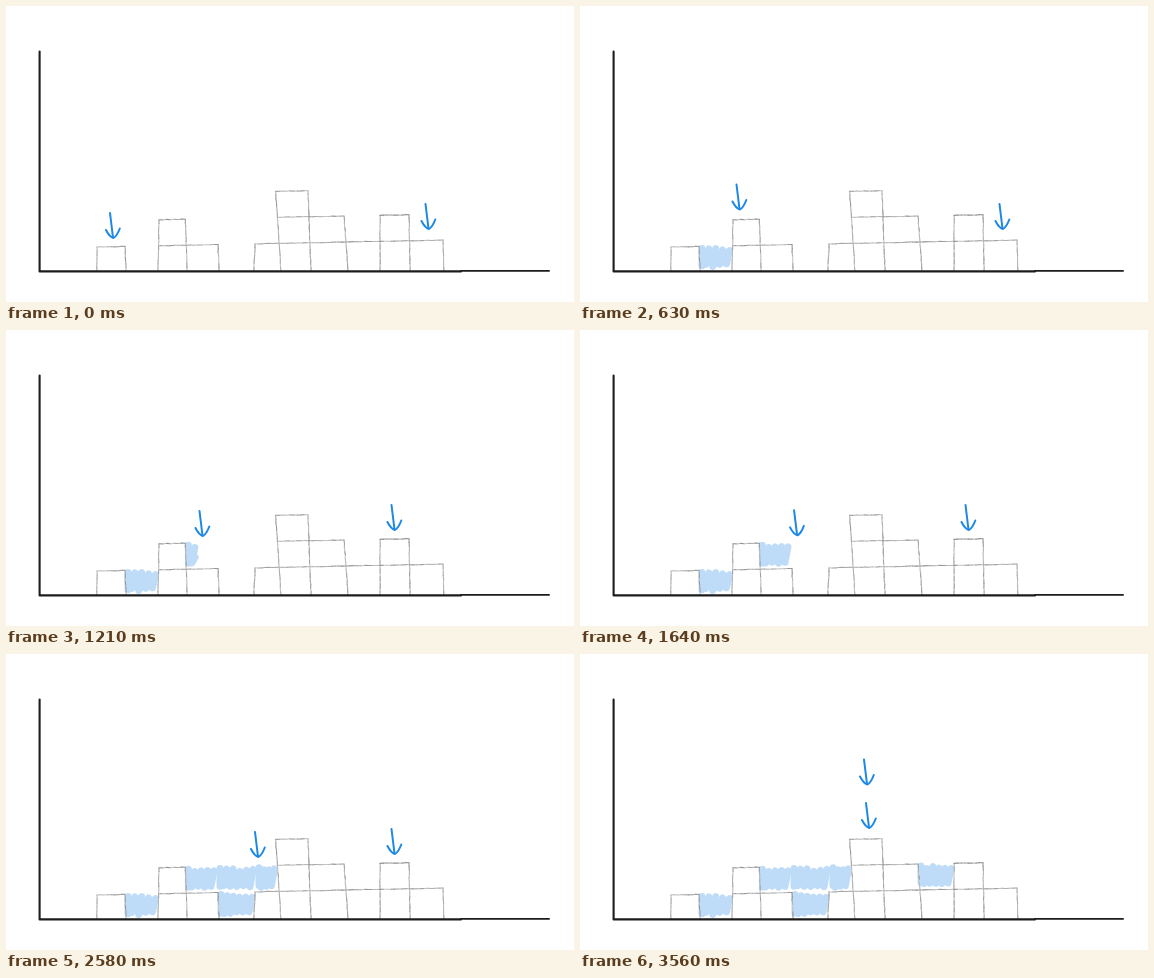
Write an HTML page with a canvas that moves like this. It is 568 px wide and 296 px high and loops after 3.6 s.

```html
<!DOCTYPE html>
<html lang="en">
<head>
<meta charset="utf-8">
<title>Collecting water between blocks</title>
<style>
html, body { margin: 0; width: 100%; height: 100%; overflow: hidden; background: #fff; }
canvas { display: block; width: 568px; height: 296px; }
</style>
</head>
<body>
<canvas id="stage" width="568" height="296"></canvas>
<script>
const LOOP = 3600;
const GROUND = 265;
const ROW = 26;
const ctx = document.getElementById('stage').getContext('2d');

// Left side at the ground, blocks stacked, lean of the side per row
const columns = [
  [91, 1, 0], [120, 0, 1], [152, 2, -0.5], [181, 1, 0.8], [213, 0, 1], [248, 1, -1],
  [275, 3, 1.8], [305, 2, 1], [342, 1, 2], [374, 2, 0], [404, 1, 0.5], [438, 0, 1]
].map(([x, level, lean]) => ({ x, level, lean }));

// Start, end, column, row
const pours = [
  [130, 360, 1, 1], [1110, 1380, 3, 2], [1690, 1850, 4, 2],
  [1850, 1990, 4, 1], [2440, 2570, 5, 2], [3300, 3420, 8, 2]
];

// Home position, then moves: start, end, x, y
const leftArrow = {
  home: [107, 231.5],
  moves: [
    [20, 130, 134, 210], [570, 630, 159.5, 203], [630, 700, 167, 198],
    [900, 1080, 196.5, 205.5], [1550, 1690, 228.5, 204.5],
    [2110, 2260, 252, 202.5], [2670, 2860, 289, 173.5]
  ]
};
const rightArrow = {
  home: [422.5, 222.5],
  moves: [[720, 880, 388.5, 199.5], [2873, 3100, 355, 199], [3420, 3550, 287, 130]]
};

const clamp = v => Math.max(0, Math.min(1, v));
const mix = (a, b, k) => a.map((v, i) => v + (b[i] - v) * k);
const dist = (a, b) => Math.hypot(b[0] - a[0], b[1] - a[1]);

function random(seed) {
  return () => (seed = seed * 16807 % 2147483647) / 2147483647;
}

function line(pts, color, width) {
  ctx.strokeStyle = color;
  ctx.lineWidth = width;
  ctx.beginPath();
  pts.forEach(([x, y]) => ctx.lineTo(x, y));
  ctx.stroke();
}

// Rows rise slightly to the right
function corner(i, row) {
  const { x, lean } = columns[i];
  const slope = row ? 0.02 * (x - 91) : 0;
  return [x - lean * row, row ? GROUND + 2 - ROW * row - slope : GROUND];
}

// Short uneven dashes give the pencil grain
function pencil(a, b, rand) {
  const n = Math.ceil(dist(a, b) / 4);
  let prev = a;
  for (let j = 1; j <= n; j++) {
    const next = mix(a, b, j / n).map(v => v + (j < n ? (rand() - 0.5) * 0.5 : 0));
    const g = Math.round(145 + rand() * 55);
    line([prev, next], `rgb(${g},${g},${g})`, 1.1);
    prev = next;
  }
}

function drawBlocks() {
  const rand = random(7);
  columns.forEach(({ level }, i) => {
    const height = Math.max(level, i ? columns[i - 1].level : 0);
    for (let row = 1; row <= height; row++) {
      pencil(corner(i, row - 1), corner(i, row), rand);
      if (row <= level) pencil(corner(i, row), corner(i + 1, row), rand);
    }
  });
}

// Leaning zigzag that fills one cell
function scribble(col, row) {
  const rand = random(col * 31 + row);
  const [x0, top] = corner(col, row);
  const [x1] = corner(col + 1, row);
  const bottom = corner(col, row - 1)[1] - 4.5;
  const n = Math.round((x1 - x0) / 8);
  const x = x0 + 3, step = (x1 - x0 - 6) / n;
  const pts = [];
  for (let i = 0; i <= n; i++) {
    pts.push([x + step * i, top + 2 + rand() * 3]);
    pts.push([Math.max(x, x + step * i - 3), bottom - rand() * 3]);
  }
  return pts;
}

function partial(pts, k) {
  let rest = k * pts.reduce((sum, p, i) => sum + (i ? dist(pts[i - 1], p) : 0), 0);
  const out = [pts[0]];
  for (let i = 1; i < pts.length && rest > 0; i++) {
    const len = dist(pts[i - 1], pts[i]);
    out.push(mix(pts[i - 1], pts[i], Math.min(1, rest / len)));
    rest -= len;
  }
  return out;
}

function drawWater(t) {
  for (const [from, to, col, row] of pours) {
    if (t > from) line(partial(scribble(col, row), clamp((t - from) / (to - from))), '#bedcf8', 7);
  }
}

function drawAxes() {
  line([[33.6, 45.5], [33.6, 265.4], [455, 265.4]], '#1c1c1c', 2.1);
  line([[455, 264.9], [543, 264.9]], '#1c1c1c', 1.9);
}

function drawArrow({ home, moves }, t) {
  const [x, y] = moves.reduce(
    (pos, [from, to, ...goal]) => mix(pos, goal, clamp((t - from) / (to - from))), home);
  line([[x - 3, y - 24.5], [x, y]], '#1e88e5', 2);
  ctx.beginPath();
  ctx.moveTo(x - 7, y - 7.5);
  ctx.quadraticCurveTo(x - 3.5, y - 0.5, x + 0.5, y + 0.5);
  ctx.quadraticCurveTo(x + 4, y - 1.5, x + 6.8, y - 9);
  ctx.stroke();
}

function draw(t) {
  ctx.fillStyle = '#fff';
  ctx.fillRect(0, 0, 568, 296);
  ctx.lineCap = ctx.lineJoin = 'round';
  drawWater(t);
  drawBlocks();
  drawAxes();
  drawArrow(leftArrow, t);
  drawArrow(rightArrow, t);
}

let start;
function tick(now) {
  start ??= now;
  draw((now - start) % LOOP);
  requestAnimationFrame(tick);
}
draw(0);
requestAnimationFrame(tick);
</script>
</body>
</html>
```
